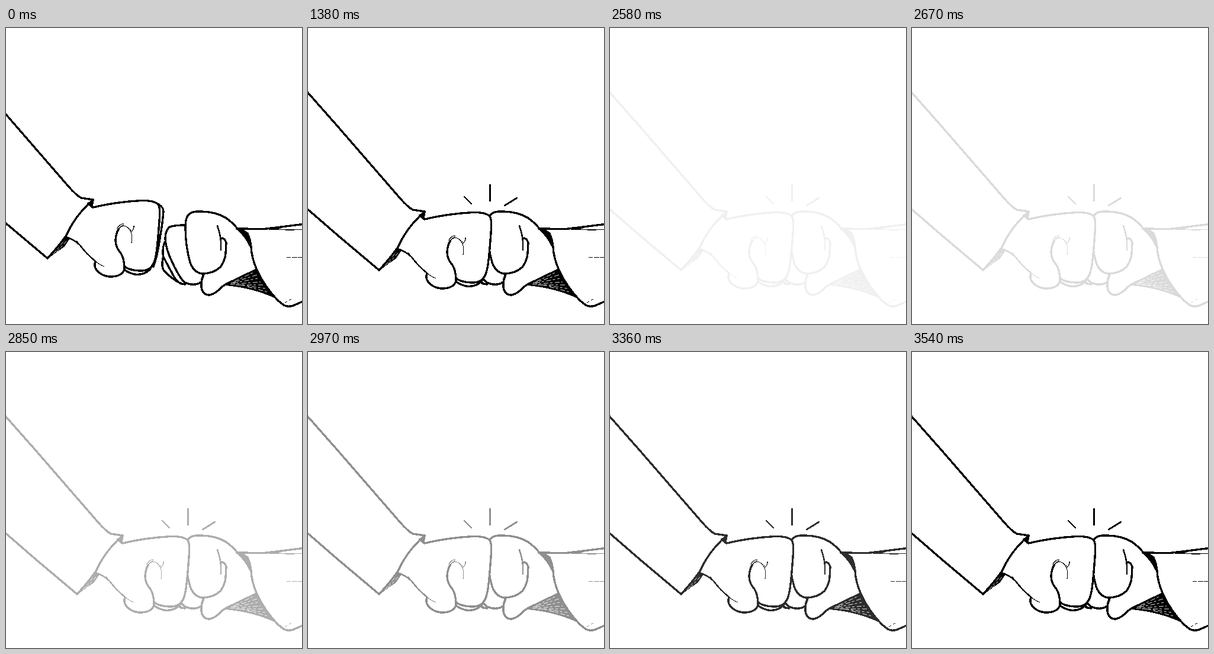
Animation, 500 px wide and 500 px high, one loop 3.6 s. Source, as an HTML page:

```html
<!DOCTYPE html>
<html lang="en">
<head>
<meta charset="utf-8">
<title>Fist bump</title>
<style>
  html, body { margin: 0; width: 100%; height: 100%; overflow: hidden; background: #fff; }
  svg { display: block; width: 100vw; height: 100vh; }
  .ink { fill: none; stroke: #000; stroke-width: 3.4; stroke-linecap: round; stroke-linejoin: round; shape-rendering: crispEdges; }
  .skin { fill: #fff; }
  .thin { stroke-width: 1.1; }
  .ray { stroke-width: 2.8; }
  .solid { fill: #000; stroke-width: 1.5; }
  .streak { stroke: #fff; stroke-width: .9; stroke-linecap: butt; stroke-dasharray: 8 3 4 4; }
  #scene { animation: fade 3.6s infinite; }
  #left { animation: bump 3.6s step-end infinite; }
  .apart { animation: apart 3.6s step-end infinite; }
  .hit { animation: hit 3.6s step-end infinite; }

  @keyframes bump {
    0% { transform: translate(0, 0); }
    38.333%, 100% { transform: translate(50px, 20px); }
  }
  @keyframes apart {
    0% { visibility: visible; }
    38.333%, 100% { visibility: hidden; }
  }
  @keyframes hit {
    0% { visibility: hidden; }
    38.333%, 100% { visibility: visible; }
  }
  /* cut to white, then a stepped fade back in */
  @keyframes fade {
    0% { opacity: 1; animation-timing-function: step-end; }
    61.666% { opacity: 0; animation-timing-function: step-end; }
    71.666% { opacity: .059; animation-timing-function: step-end; }
    72.499% { opacity: .088; animation-timing-function: steps(8, end); }
    85.833% { opacity: .559; animation-timing-function: steps(5, end); }
    89.999% { opacity: .706; animation-timing-function: steps(5, end); }
    98.333%, 100% { opacity: 1; }
  }
</style>
</head>
<body>
<svg viewBox="0 0 500 500">
  <g id="scene" class="ink">
    <g id="right">
      <!-- folded fingers -->
      <path class="skin" d="M265 389Q262 404 267 410Q280 424 296 432L304 429L282 398Z"/>
      <path class="skin" d="M268 362Q263 374 266 387Q276 406 286 424Q292 432 302 433L318 410L280 370Z"/>
      <path class="skin" d="M303 333Q282 333 275 337Q269 344 269 356Q270 374 281 396Q293 422 302 430Q318 437 330 429L335 412Z"/>
      <!-- sleeve -->
      <path d="M390 339L436 339.500L501 331.500"/>
      <path class="thin" d="M436 339.500Q470 342 501 340.500"/>
      <path class="solid" d="M436 339L472 335L460 339Z"/>
      <path class="solid" d="M368 434Q393 421 423 407Q433 431 455 456Q417 438 368 434Z"/>
      <path class="streak" d="M386 428L420 412M380 431L424 417M384 431L425 423M379 433L430 429M388 434L434 434M396 434L438 440M408 437L442 446"/>
      <path class="solid" d="M390 338Q403 340 408 347Q412 354 412 366Q404 351 390 338Z"/>
      <path d="M408 347Q413 358 414 370Q415 390 425 411Q437 437 459 460L469 468Q476 472 485 469L501 462"/>
      <path class="thin" d="M475 387.500H480M484 387.500H491M494 387.500H499M471 464L475 462M478 460L482 458"/>
      <!-- thumb and fist -->
      <path d="M335 414Q329 424 330 438Q332 451 344 451Q354 449 364 438Q370 433 381 428"/>
      <path class="skin" stroke="none" d="M303 337C303 318 308 311 322 310C345 309 362 315 372 321L380 370L362 404Q350 415 331 415Q317 413 311 396C306 378 303 356 303 337Z"/>
      <path d="M412 367Q405 352 392 340Q383 329 372 321C362 315 345 309 322 310C308 311 303 318 303 337C303 356 306 378 311 396Q317 413 331 415Q350 415 362 404Q370 393 371 381L372 363Q370 356 365 355"/>
      <path d="M357 334Q363 352 363 362V375" stroke-width="2.6"/>
    </g>

    <g id="left">
      <path class="apart skin" d="M258 298Q266 303 266 310Q264 333 261 349Q256 385 249 403Z"/>
      <!-- lower finger -->
      <path class="skin" d="M198 406Q204 413 217 416Q233 418 243 408L248 398L200 400Z"/>
      <!-- fist -->
      <path class="skin" stroke="none" d="M147 303Q185 294 228 291Q252 291 259 300C262 315 258 340 257 352C255 372 254 390 248 400Q242 411 225 410Q208 409 200 403Q199 418 180 419Q152 418 150 398L104 354Z"/>
      <path d="M147 303Q185 294 228 291.500Q250 291 257 298Q261 304 259 326Q258 340 257 352C255 372 254 390 248 400Q242 411 225 410Q208 409 200 403Q199 387 193 379Q185 370 185 358Q186 347 190 340"/>
      <path class="thin" d="M186 349Q189 337 199 332M187 339Q193 331 199 330M194 336Q205 331 211 345Q214 352 212 363M216 334Q217 339 211 345M210 340L212 348"/>
      <!-- thumb -->
      <path d="M100 352Q116 358 125 367Q137 383 150 393" stroke-width="2.5"/>
      <path d="M151 395Q148 402 153 409Q160 418 174 420Q190 421 197 413Q201 408 200 402"/>
      <path class="thin" d="M148 392Q158 400 166 403M119 359L126 368" stroke-width="1.8"/>
      <!-- sleeve -->
      <path class="solid" d="M138 296L148 291L145 303Z"/>
      <path class="solid" d="M70 389L101 352L106 357L98 369Z"/>
      <path class="streak" d="M80 382L99 358M85 379L102 360"/>
      <path d="M-53 86L0 146L105 267Q119 283 127 287L147 290L145 302M144 293Q117 317 102 350Q89 369 70 389L0 330L-53 284"/>
    </g>

    <path class="hit ray" d="M264 285L276 297M307.500 265V292M332 300L353 287"/>
  </g>
</svg>
</body>
</html>
```
